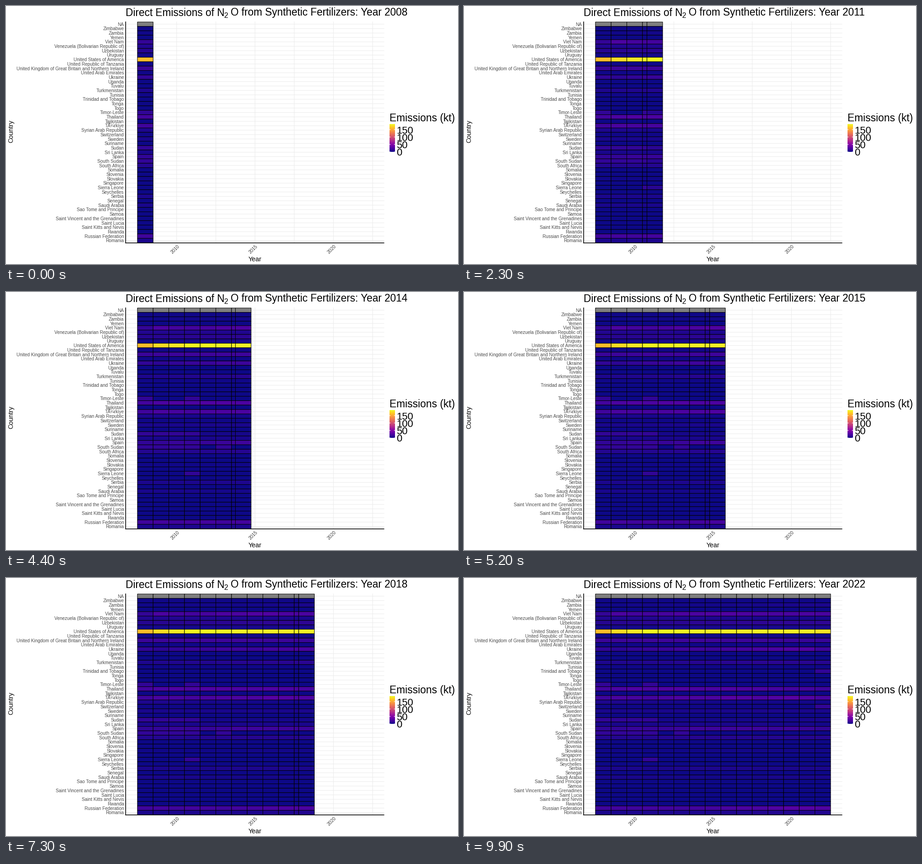
Animation of 990x566 px, one loop 10000 ms. Source, as a matplotlib script:

```python
import numpy as np
import matplotlib.pyplot as plt
from matplotlib.animation import FuncAnimation

W, H, DPI = 990, 566, 100
FRAMES, INTERVAL = 100, 100
FIRST, N_YEARS = 2008, 15
PX = 72 / DPI  # points per pixel

COUNTRIES = """NA|Zimbabwe|Zambia|Yemen|Viet Nam|Venezuela (Bolivarian Republic of)
Uzbekistan|Uruguay|United States of America|United Republic of Tanzania
United Kingdom of Great Britain and Northern Ireland|United Arab Emirates
Ukraine|Uganda|Tuvalu|Turkmenistan|Tunisia|Trinidad and Tobago|Tonga|Togo
Timor-Leste|Thailand|Tajikistan|TÃ¼rkiye|Syrian Arab Republic|Switzerland
Sweden|Suriname|Sudan|Sri Lanka|Spain|South Sudan|South Africa|Somalia
Slovenia|Slovakia|Singapore|Sierra Leone|Seychelles|Serbia|Senegal
Saudi Arabia|Sao Tome and Principe|Samoa|Saint Vincent and the Grenadines
Saint Lucia|Saint Kitts and Nevis|Rwanda|Russian Federation
Romania""".replace("\n", "|").split("|")

# Emissions in kt, spread evenly over the years
SERIES = {
    "United States of America": [160, 174, 180, 187, 187, 186, 184, 182, 182,
                                 182, 183, 184, 183, 182, 178],
    "Viet Nam": [13, 23, 20, 19, 21, 24, 23, 25, 25, 24, 23, 22, 22, 23, 22],
    "Thailand": [19, 23, 25, 23, 25, 25, 24, 23, 25, 24, 23, 21, 20, 20, 18],
    "TÃ¼rkiye": [18, 22, 21, 20, 22, 24, 23, 23, 28, 27, 24, 26, 29, 27, 22],
    "Russian Federation": [18, 19, 18, 19, 19, 18, 19, 20, 22, 24, 23, 25, 28, 28, 25],
    "Ukraine": [12, 10, 12, 14, 15, 17, 17, 16, 19, 20, 22, 23, 25, 26, 17],
    "Spain": [12, 13, 15, 14, 14, 16, 18, 17, 17, 18, 17, 16, 17, 16, 13],
    "United Kingdom of Great Britain and Northern Ireland": [16, 17, 17, 16, 15],
    "Uzbekistan": [8, 9, 10, 11, 11],
    "Turkmenistan": [5, 6, 8, 9, 8],
    "South Africa": [7, 7, 8, 7, 8],
    "Venezuela (Bolivarian Republic of)": [6, 6, 5, 4, 3],
    "Syrian Arab Republic": [5, 3, 2, 2, 2],
    "Romania": [4, 5, 5, 6, 6],
    "Serbia": [4, 4, 5, 4, 4],
    "Sri Lanka": [3, 3, 3, 3, 2],
    "Sweden": [3, 3, 3, 4, 3],
    "Saudi Arabia": [3, 3, 2, 3, 3],
    "Uruguay": [2, 3, 3, 3, 4],
    "Zambia": [1, 2, 2, 3, 4],
    "Tunisia": [1, 1],
    "Zimbabwe": [1, 1],
    "United Republic of Tanzania": [1, 2],
    "United Arab Emirates": [1, 1],
    "Slovakia": [1, 2],
    "Switzerland": [1, 1],
    "Sudan": [2, 3],
}
# Single years that stand out: (country, years, kt)
SPIKES = [
    ("Timor-Leste", (2008, 2011), 12),
    ("Sudan", range(2008, 2012), 12),
    ("South Sudan", range(2008, 2012), 12),
    ("South Sudan", (2013,), 12),
    ("Sierra Leone", (2011,), 12),
    ("Trinidad and Tobago", (2022,), 12),
    ("Switzerland", (2022,), 12),
]

TOP_ROW, ROW_H = 39.9, 9.685
LEFT, RIGHT, TOP, BOTTOM = 262.1, 828.5, 34.1, 519.7
ROWS = TOP_ROW + ROW_H * np.arange(len(COUNTRIES))
EDGES = TOP_ROW + ROW_H * (np.arange(len(COUNTRIES) + 1) - 0.5)
MAX_KT = 187
CMAP = plt.get_cmap("plasma").with_extremes(bad="#7f7f7f")

# Each year lands on a whole frame
KEYS = np.round((FRAMES - 1) * np.arange(N_YEARS) / (N_YEARS - 1))


def year_x(year):
    return 287.9 + 34.34 * (year - FIRST + 0.5)


def build_values():
    values = np.zeros((len(COUNTRIES), N_YEARS))
    steps = np.linspace(0, 1, N_YEARS)
    for name, kt in SERIES.items():
        values[COUNTRIES.index(name)] = np.interp(steps, np.linspace(0, 1, len(kt)), kt)
    for name, years, kt in SPIKES:
        for year in years:
            values[COUNTRIES.index(name), year - FIRST] = kt
    values[0] = np.nan
    return values


VALUES = build_values()

plt.rcParams["font.family"] = "Liberation Sans"
fig = plt.figure(figsize=(W / DPI, H / DPI), dpi=DPI, facecolor="white")
ax = fig.add_axes([0, 0, 1, 1])
ax.set_xlim(0, W)
ax.set_ylim(H, 0)
ax.axis("off")


def label(x, y, text, size, color="black", **kw):
    kw.setdefault("va", "baseline")
    return ax.text(x, y, text, fontsize=size * PX, color=color, **kw)


def line(xs, ys, color, width=1, z=1):
    ax.plot(xs, ys, color=color, lw=width * PX, zorder=z, snap=False,
            solid_capstyle="butt")


# Grid and axes
for y in ROWS:
    line([LEFT, RIGHT], [y, y], "#ebebeb")
for year in np.arange(2007.5, 2023, 2.5):
    line([year_x(year)] * 2, [TOP, BOTTOM], "#ebebeb")
line([LEFT, LEFT], [TOP, BOTTOM + 0.7], "black", 1.6, 4)
line([LEFT - 0.7, RIGHT], [BOTTOM, BOTTOM], "black", 1.6, 4)

# Axis labels
for y, name in zip(ROWS, COUNTRIES):
    label(258.3, y + 3.8, name, 10, "#4d4d4d", ha="right")
for year in (2010, 2015, 2020):
    label(year_x(year) - 3.5, 534, str(year), 10.3, "#4d4d4d", rotation=45,
          ha="center", va="center")
label(545, 559.5, "Year", 14.2, ha="center")
label(18.5, 275, "Country", 14.2, rotation=90, ha="right", va="center")

# Title
label(262, 21.5, "Direct Emissions of N", 22.6)
label(477.5, 26, "2", 15.8)
title = label(491.5, 21.5, "", 22.6)

# Legend
BAR_L, BAR_R, BAR_T, BAR_B = 840, 852, 259, 320
label(839.5, 253, "Emissions (kt)", 22.7)
ax.imshow(np.linspace(1, 0, 300)[:, None], cmap=CMAP, aspect="auto", zorder=2,
          extent=(BAR_L, BAR_R, BAR_B, BAR_T))
for kt in (0, 50, 100, 150):
    y = BAR_B - (BAR_B - BAR_T) * kt / MAX_KT
    for x in (BAR_L, BAR_R - 2.4):
        line([x, x + 2.4], [y, y], "white", z=3)
    label(855.5, y + 8.5, str(kt), 22)

mesh = None


def update(i):
    """Show all years passed so far plus the column sliding to the next one."""
    global mesh
    t = np.interp(i, KEYS, np.arange(N_YEARS))
    n = int(t + 1e-9)
    frac = t - n
    cols = VALUES[:, :n + 1]
    years = list(range(n + 1))
    if frac > 1e-6:
        moving = VALUES[:, n] * (1 - frac) + VALUES[:, n + 1] * frac
        cols = np.column_stack([cols, moving])
        years.append(t)
    xs = year_x(FIRST + np.array(years + [years[-1] + 1]) - 0.5)

    if mesh is not None:
        mesh.remove()
    mesh = ax.pcolormesh(xs, EDGES, np.ma.masked_invalid(cols), cmap=CMAP,
                         vmin=0, vmax=MAX_KT, edgecolors="black",
                         linewidth=PX, antialiased=True, snap=False, zorder=3)
    year = round(FIRST + (N_YEARS - 1) * i / (FRAMES - 1))
    title.set_text(f"O from Synthetic Fertilizers: Year {year}")
    return mesh, title


anim = FuncAnimation(fig, update, frames=FRAMES, interval=INTERVAL,
                     init_func=lambda: update(0), repeat=True, repeat_delay=0)
plt.show()
```
